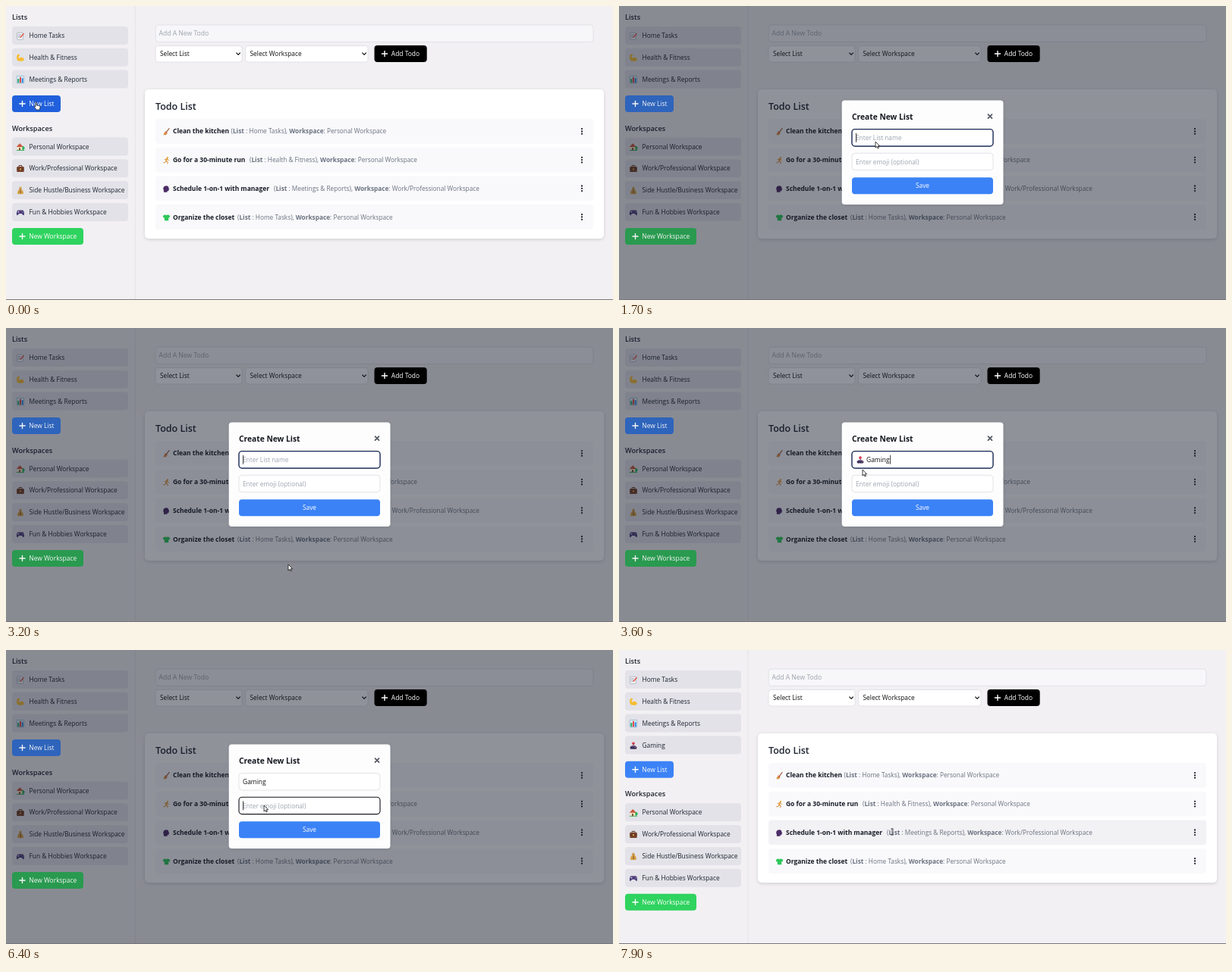
Recreate the animation shown at these times as an HTML page. Size 800 by 388 pixels, loop 8 s.

```html
<!DOCTYPE html>
<html lang="en">
<head>
<meta charset="utf-8">
<title>Todo app</title>
<style>
html, body { margin: 0; width: 100%; height: 100%; overflow: hidden; background: #f2f0f3; }
svg { display: block; width: 800px; height: 388px; }
text { font-family: "Open Sans", "Noto Sans", sans-serif; white-space: pre; }
</style>
</head>
<body>
<svg id="stage" viewBox="0 0 800 388"></svg>
<script>
const LOOP = 8000, STEP = 100;
const BLUE = '#3b82f6', HOVER = '#2160dc', GREEN = '#2fd35f';
const $ = id => document.getElementById(id);

// Shape helpers
const rect = (x, y, w, h, r, fill, extra = '') =>
  `<rect x="${x}" y="${y}" width="${w}" height="${h}" rx="${r}" fill="${fill}" ${extra}/>`;
const text = (x, y, s, size = 8.35, weight = 400, fill = '#1f2430', extra = '') =>
  `<text x="${x}" y="${y}" font-size="${size}" font-weight="${weight}" fill="${fill}" ${extra}>${s}</text>`;
const path = (d, fill, stroke = 'none', w = 1, extra = '') =>
  `<path d="${d}" fill="${fill}" stroke="${stroke}" stroke-width="${w}" ${extra}/>`;
const line = (d, stroke, w = 1) => path(d, 'none', stroke, w, 'stroke-linecap="round" stroke-linejoin="round"');
const dot = (x, y, r, fill) => `<circle cx="${x}" cy="${y}" r="${r}" fill="${fill}"/>`;
const group = (id, body, extra = '') => `<g id="${id}" ${extra}>${body}</g>`;
const border = 'stroke="#dcdce2" stroke-width=".8"';
const plus = (x, y, r = 3.6) => line(`M${x - r} ${y}h${2 * r}M${x} ${y - r}v${2 * r}`, '#fff', 1.4);
const cross = (x, y, r, color, w) =>
  line(`M${x - r} ${y - r}l${2 * r} ${2 * r}M${x + r} ${y - r}l${-2 * r} ${2 * r}`, color, w);

// Small pictograms, centred on the origin
const icons = {
  note: rect(-4.5, -4.5, 8, 9.5, .8, '#fbfbfd', 'stroke="#8f99ab" stroke-width=".7"') +
    line('M-3 -2h4M-3 0h3M-3 2h2.5', '#7c879a', .7) + line('M4.4 -3L.2 1.8', '#e0503f', 1.5),
  muscle: path('M-5 -2.5L-3.5 -5L-1 -4.3L-1.6 -2L-2.6 -1.6L-2 1C0 -1.6 4.5 -1 5 2.2C5 5 1 5 -1.5 4.6C-5 4.5 -5.4 1 -5 -2.5Z', '#f7bd32'),
  chart: rect(-5, -5, 10, 10, .8, '#dcf0f8', 'stroke="#6d9fc4" stroke-width=".6"') +
    rect(-3.9, -1, 2.1, 5.5, 0, '#27a65c') + rect(-1.1, -3.5, 2.1, 8, 0, '#e04a4a') + rect(1.8, -2, 2.1, 6.5, 0, '#2f86dd'),
  house: dot(3.3, 1.5, 2.6, '#27b45b') + rect(-4, -1, 6.5, 5.5, 0, '#f3e3c7') +
    path('M-5.5 0L-.8 -5L4 0Z', '#c8573d') + rect(-2, 1.3, 2, 3.2, 0, '#7c4a2e') + line('M-5 4.7h10', '#39a853', 1),
  briefcase: path('M-2 -3v-1.5h4v1.5', 'none', '#59311f', 1) + rect(-5, -3, 10, 7.5, 1, '#76422b') +
    line('M-4.6 .4h9.2', '#4f2a1b', .8) + rect(-1, -.4, 2, 1.8, .3, '#e5b64c'),
  money: path('M-1.8 -5h3.6l-.9 2.4C4.2 -.5 5.4 4.8 3 4.8H-3C-5.4 4.8 -4.2 -.5 -.9 -2.6Z', '#d9a54e') +
    line('M-1.2 -2.5h2.4', '#98642a', .9) + text(-1.4, 3.3, '$', 4.8, 700, '#805420'),
  pad: path('M-3.2 -3H3.2C5.2 -3 6 4 4.4 4C3 4 2.5 1.7 1.4 1.7H-1.4C-2.5 1.7 -3 4 -4.4 4C-6 4 -5.2 -3 -3.2 -3Z', '#4a3a78') +
    line('M-3.7 -.7h2M-2.7 -1.7v2', '#d4cfe8', .7) + dot(2.2, -1.3, .7, '#e44b6d') + dot(3.4, -.2, .7, '#44b8e0'),
  broom: line('M4 -5L-.5 1', '#9a5430', 1.3) + path('M-1.6 -.4L1 1.6L-.5 4.6L-4.5 4.8L-3.6 2Z', '#d98f48') + line('M-1.7 -.1L.8 1.8', '#c5413b', .9),
  runner: dot(1.6, -4, 1.3, '#e9aa42') + line('M.8 -2.2L-.6 1', '#efa22c', 2.1) +
    line('M.6 -2L3.3 -.2M.4 -2.2L-2.6 -1.2M-.4 1L2 2.2L1.4 4.8M-.8 1L-1.8 3.2L-4.3 3.4', '#d88e45', 1.1),
  head: path('M-4 4.8V2C-6 -1.5 -3.6 -5 0 -4.7C3 -4.5 3.3 -2.3 3.2 -1.2L4.4 .6L3.2 1V2.6C3 3.5 1.6 3.2 1 3.3V4.8Z', '#4b2c65'),
  shirt: path('M-2 -4.2C-1 -3 1 -3 2 -4.2L5.4 -2.2L4.2 .6L3 .2V4.6H-3V.2L-4.2 .6L-5.4 -2.2Z', '#2fc75a'),
  stick: rect(-4.6, 1, 9.2, 3.8, 1.6, '#3b3258') + rect(-3, .2, 6, 1.6, .8, '#5c4d80') +
    line('M0 .6V-2', '#6a6a78', 1.2) + dot(0, -3, 1.9, '#d93a50') + dot(2.8, 2.4, .7, '#e06a78')
};
const icon = (name, x, y, k = .95) => `<g transform="translate(${x} ${y}) scale(${k})">${icons[name]}</g>`;

// Page parts
const sideItem = (name, label, y) =>
  rect(8, y - 12, 153, 24, 4, '#e2e2e8') + icon(name, 19, y + .5) + text(30.5, y + 3, label);
const button = (id, x, y, w, h, label, fill) =>
  rect(x, y, w, h, 4, fill, `id="${id}"`) + plus(x + 13.5, y + h / 2) + text(x + 22.3, y + h / 2 + 3, label, 8.45, 400, '#fff');
const select = (x, w, label) =>
  rect(x, 52.5, w, 21.5, 3.5, '#fff', border) + text(x + 6, 66.4, label, 8.4, 400, '#111') +
  line(`M${x + w - 7.2} 62l2.3 2.4l2.3 -2.4`, '#222', 1.2);
const row = (i, name, title, x, list, space) => {
  const y = 165.4 + 37.7 * i;
  const bold = s => `<tspan font-weight="700">${s}</tspan>`;
  return rect(197, y - 16.4, 577, 32.8, 4, '#f9f9fb', `id="row${i}"`) + icon(name, 211.5, y + .6, .9) +
    text(220, y + 3, title, 8.45, 700, '#171b26') +
    text(x, y + 3, `(${bold('List')} : ${list}), ${bold('Workspace')}: ${space} Workspace`, 8.28, 400, '#6b7280') +
    [-3.3, 0, 3.3].map(d => dot(759, y + d, 1.15, '#22252d')).join('');
};

const listNames = [['note', 'Home Tasks'], ['muscle', 'Health &amp; Fitness'], ['chart', 'Meetings &amp; Reports']];
const spaceNames = [['house', 'Personal Workspace'], ['briefcase', 'Work/Professional Workspace'],
  ['money', 'Side Hustle/Business Workspace'], ['pad', 'Fun &amp; Hobbies Workspace']];
const stack = (items, y) => items.map(([n, s], i) => sideItem(n, s, y + 28.8 * i)).join('');

const page =
  rect(0, 0, 800, 388, 0, '#f2f0f3') + line('M170.3 0V388', '#e1e1e6', .9) +
  text(8, 18.2, 'Lists', 9.2, 600) + stack(listNames, 39) +
  group('newItem', sideItem('stick', 'Gaming', 125.6)) +
  group('spaces', text(8, 164.6, 'Workspaces', 9.2, 600) + stack(spaceNames, 185.5)) +
  rect(197, 25, 577, 22.4, 4, '#f7f6f8', border) + text(201.5, 39.4, 'Add A New Todo', 8.6, 400, '#9ca3af') +
  select(197, 114, 'Select List') + select(315.5, 161.5, 'Select Workspace') +
  rect(183, 111, 605, 197.5, 5, '#000', 'opacity=".13" filter="url(#blur)"') +
  rect(183, 110, 605, 197, 5, '#fff') + text(197, 137, 'Todo List', 12.5, 600) +
  row(0, 'broom', 'Clean the kitchen', 296.5, 'Home Tasks', 'Personal') +
  row(1, 'runner', 'Go for a 30-minute run', 321, 'Health &amp; Fitness', 'Personal') +
  row(2, 'head', 'Schedule 1-on-1 with manager', 353, 'Meetings &amp; Reports', 'Work/Professional') +
  row(3, 'shirt', 'Organize the closet', 305, 'Home Tasks', 'Personal') +
  rect(0, 387, 800, 1, 0, '#77777c');

const buttons =
  group('sideButtons',
    button('newList', 8, 118, 64, 22, 'New List', BLUE) +
    button('newSpace', 8, 293, 94, 22, 'New Workspace', GREEN)) +
  button('add', 485.5, 52, 69.2, 22, 'Add Todo', '#000');

const caret = (id, x, y) => rect(x, y - 6, .8, 12, 0, '#111', `id="${id}"`);
const modal =
  rect(294, 125, 212.5, 137.5, 4, '#000', 'opacity=".1" filter="url(#blur)"') +
  rect(293.7, 124.4, 212.8, 137.6, 4, '#fdfdfe') +
  text(307, 149.6, 'Create New List', 10.25, 700, '#15181f') + cross(489, 145.6, 2.5, '#555a63', 1.8) +
  rect(307, 162.6, 186, 22.4, 4, '#fff', border) +
  group('focus1', rect(307.6, 163.2, 184.8, 21.2, 3.5, 'none', 'stroke="#a9c3f3" stroke-width="1"') +
    rect(306.9, 162.5, 186.2, 22.6, 4, 'none', 'stroke="#17213f" stroke-width="1.2"')) +
  text(312, 176.8, 'Enter List name', 8.3, 400, '#9ca3af', 'id="hint1"') +
  rect(311.6, 167, 14.6, 13.4, 0, '#2862d4', 'id="mark"') +
  group('emoji1', icon('stick', 318, 174)) +
  text(326, 176.8, 'Gaming', 8.45, 400, '#111', 'id="name"') +
  caret('caret1', 312, 173.8) +
  rect(307, 194.2, 186, 22.4, 4, '#fff', border) +
  rect(307, 194.2, 186, 22.4, 4, 'none', 'stroke="#1b1c22" stroke-width="1.1" id="focus2"') +
  text(312, 208.8, 'Enter emoji (optional)', 8.3, 400, '#9ca3af', 'id="hint2"') +
  group('emoji2', icon('stick', 318, 206)) + caret('caret2', 312, 205.4) +
  rect(307, 226.3, 186, 22, 4, BLUE, 'id="save"') +
  text(400, 240.3, 'Save', 8.4, 400, '#fff', 'text-anchor="middle"');

const white = '#f6f9fa';
const clip = (y, name, label, edge) =>
  rect(320, y, 170, 40, 3, '#0b2238', `fill-opacity=".35" ${edge}`) + icon(name, 330, y + 11, .75) +
  text(337, y + 13, label, 7.1, 400, white) +
  [-2, 0, 2].map(d => dot(479.6 + d, y + 10.3, .65, white)).join('') +
  line(`M477 ${y + 33}l2 -2M477.8 ${y + 29.4}l2.8 2.8l.4 -1.7l1.7 -1.8l-1.8 -1.8l-1.6 1.8z`, white, .8);
const fold = (d, fill) => path(d, fill, 'none', 1, 'filter="url(#soft)"');
const popup =
  rect(311, 186, 188, 204, 6, '#000', 'opacity=".45" filter="url(#glow)"') +
  `<g clip-path="url(#panel)">` + rect(311, 179, 188, 210, 0, 'url(#night)') +
  fold('M311 196H365C390 225 440 235 480 262C430 270 350 250 311 225Z', '#12505f') +
  fold('M400 195H480C470 215 490 235 499 255C460 245 420 225 400 195Z', '#1c2c62') +
  fold('M311 262C360 285 430 270 480 262L499 300C430 290 370 320 311 300Z', '#0a2340') +
  fold('M311 330C360 340 395 300 440 303S480 325 499 318V345C440 350 390 352 311 358Z', '#176f62') +
  fold('M311 358C370 372 410 338 499 345V388H311Z', '#1f4d88') +
  fold('M311 388C350 358 400 392 470 366L480 388Z', '#0c2c52') +
  fold('M490 195H502V265C484 240 484 215 490 195ZM502 335V390H478C490 375 484 350 502 335Z', '#532c70') +
  rect(311, 179, 188, 16.5, 0, '#15504c') + '</g>' +
  rect(397, 186.2, 16, 2, 1, '#a2bab8') + cross(488, 187.2, 2.1, white, .9) +
  rect(326.5, 206, 7, 7, 1, 'none', `stroke="${white}"`) + dot(332.3, 207.6, 2.1, white) +
  `<circle cx="351.5" cy="209.5" r="4" fill="none" stroke="${white}"/>` + dot(350, 208.5, .6, white) + dot(353, 208.5, .6, white) +
  line('M349.7 211q1.8 1.6 3.6 0', white, .7) +
  rect(368.8, 206, 8.4, 7, 1, 'none', `stroke="${white}"`) + text(373, 211.4, 'GIF', 3.9, 700, white, 'text-anchor="middle"') +
  text(394, 212, ';-)', 7.5, 600, white, 'text-anchor="middle"') +
  line('M412 206h2.5M412 208.6h2.5M417 206l2 2.5M417 212h3M418.5 210.5v3M412 211l2.6 2.6M414.6 211l-2.6 2.6', white, .9) +
  rect(433.2, 206, 7, 7.8, 1, 'none', `stroke="${white}"`) + line('M435.5 205.6h2.4M435 209h3.4M435 211h3.4', white, .8) +
  rect(432.5, 218.4, 8.5, 1.6, .8, '#8fdce0') +
  text(319.5, 240.6, 'Clipboard', 7.1, 400, white) +
  rect(457.5, 232, 33, 12.4, 2, '#354067', 'stroke="#56608a" stroke-width=".5"') +
  text(474, 240.5, 'Clear all', 6.2, 400, white, 'text-anchor="middle"') +
  rect(495, 240, 1.5, 13, .7, '#eef2f5') +
  clip(250.8, 'pad', 'Play 1 hour of Moss Vigil', 'stroke="#fff" stroke-width="1.5"') +
  clip(296.8, 'stick', 'Gaming', '') + clip(342.8, 'shirt', 'Organize the closet', '');

const ink = 'stroke-linejoin="round"';
const cursors = group('cursor',
  group('arrow', path('M0 0V8L1.9 6.3L3.1 9L4.4 8.4L3.2 5.8H5.6Z', '#fff', '#111', .8, ink)) +
  group('hand', path('M0 1C0 -.3 1.6 -.3 1.6 1V4L5 4.8C6 5 6.2 5.8 6 6.8L5.3 10H1.2L-1.6 6.5C-2 5.6 -1 5.1 0 6Z', '#fff', '#222', .8, ink)) +
  group('beam', line('M-1.5 -4h3M0 -4V4M-1.5 4h3', '#333', .8)));

const blur = (id, size) =>
  `<filter id="${id}" x="-20%" y="-20%" width="140%" height="140%"><feGaussianBlur stdDeviation="${size}"/></filter>`;
$('stage').innerHTML =
  `<defs>${blur('blur', 2)}${blur('soft', 2.5)}${blur('glow', 9)}
  <clipPath id="panel"><rect x="311.3" y="179.3" width="187.4" height="208" rx="4"/></clipPath>
  <linearGradient id="night" x2=".7" y2="1"><stop stop-color="#0c2c48"/><stop offset=".45" stop-color="#0d3550"/>
  <stop offset="1" stop-color="#0d3a58"/></linearGradient></defs>` +
  page + rect(0, 0, 800, 387, 0, '#111827', 'opacity=".47" id="shade"') +
  buttons + group('modal', modal) + group('popup', popup) + cursors;

// Pointer stops: time, x, y
const stops = [[0, 39, 127], [300, 39, 127], [1300, 338, 179], [2200, 338, 179], [2600, 378, 284],
  [3000, 372, 312], [3200, 372, 312], [3600, 321, 187], [4400, 327, 174], [4600, 327, 174],
  [5000, 306, 172], [5600, 306, 172], [6200, 340, 205], [6700, 340, 205], [7200, 360, 240], [8000, 360, 240]];
const pointer = t => {
  const i = stops.findIndex(s => s[0] > t), a = stops[i - 1], b = stops[i];
  const p = (t - a[0]) / (b[0] - a[0]), e = p * p * (3 - 2 * p);
  return [a[1] + (b[1] - a[1]) * e, a[2] + (b[2] - a[2]) * e];
};
const show = (id, on) => $(id).style.display = on ? '' : 'none';
const fill = (id, color) => $(id).setAttribute('fill', color);

function draw(t) {
  const open = t >= 200 && t < 7700, saved = t >= 7700;
  const pasted = t >= 3300, cut = t >= 5600, second = t >= 6200, moved = t >= 6600;
  const [x, y] = pointer(t);
  const onSave = open && t > 7000 && y > 226;
  const shift = `translate(0 ${saved ? 28.8 : 0})`;

  for (const id of ['shade', 'modal']) show(id, open);
  show('newItem', saved);
  for (const id of ['spaces', 'sideButtons']) $(id).setAttribute('transform', shift);
  $('sideButtons').setAttribute('opacity', open ? .9 : 1);
  fill('newList', open ? '#2560c0' : t < 200 ? HOVER : BLUE);
  fill('newSpace', open ? '#1f9c48' : GREEN);
  fill('row2', saved ? '#f2f1f4' : '#f9f9fb');

  const focused = t >= 1300 && !second;
  show('focus1', focused);
  show('hint1', !pasted);
  show('name', pasted);
  show('emoji1', pasted && !cut);
  show('mark', t >= 4900 && !cut);
  $('name').setAttribute('x', cut ? 312 : 326);
  show('caret1', focused && (t < 4600 || cut));
  $('caret1').setAttribute('x', pasted && !cut ? 357.3 : 312);
  show('focus2', second);
  show('hint2', !moved);
  show('emoji2', moved);
  show('caret2', second && !moved);
  fill('save', onSave ? HOVER : BLUE);

  show('popup', t >= 2300 && t < 3200);
  $('popup').setAttribute('transform', `translate(0 ${t < 2400 ? 12 : 0})`);

  const hand = t <= 300 || onSave;
  show('hand', hand);
  show('beam', saved);
  show('arrow', !hand && !saved);
  $('cursor').setAttribute('transform', `translate(${x} ${y})`);
}

const start = performance.now();
function tick() {
  const t = (performance.now() - start) % LOOP;
  draw(Math.floor(t / STEP) * STEP);
  requestAnimationFrame(tick);
}
tick();
</script>
</body>
</html>
```
